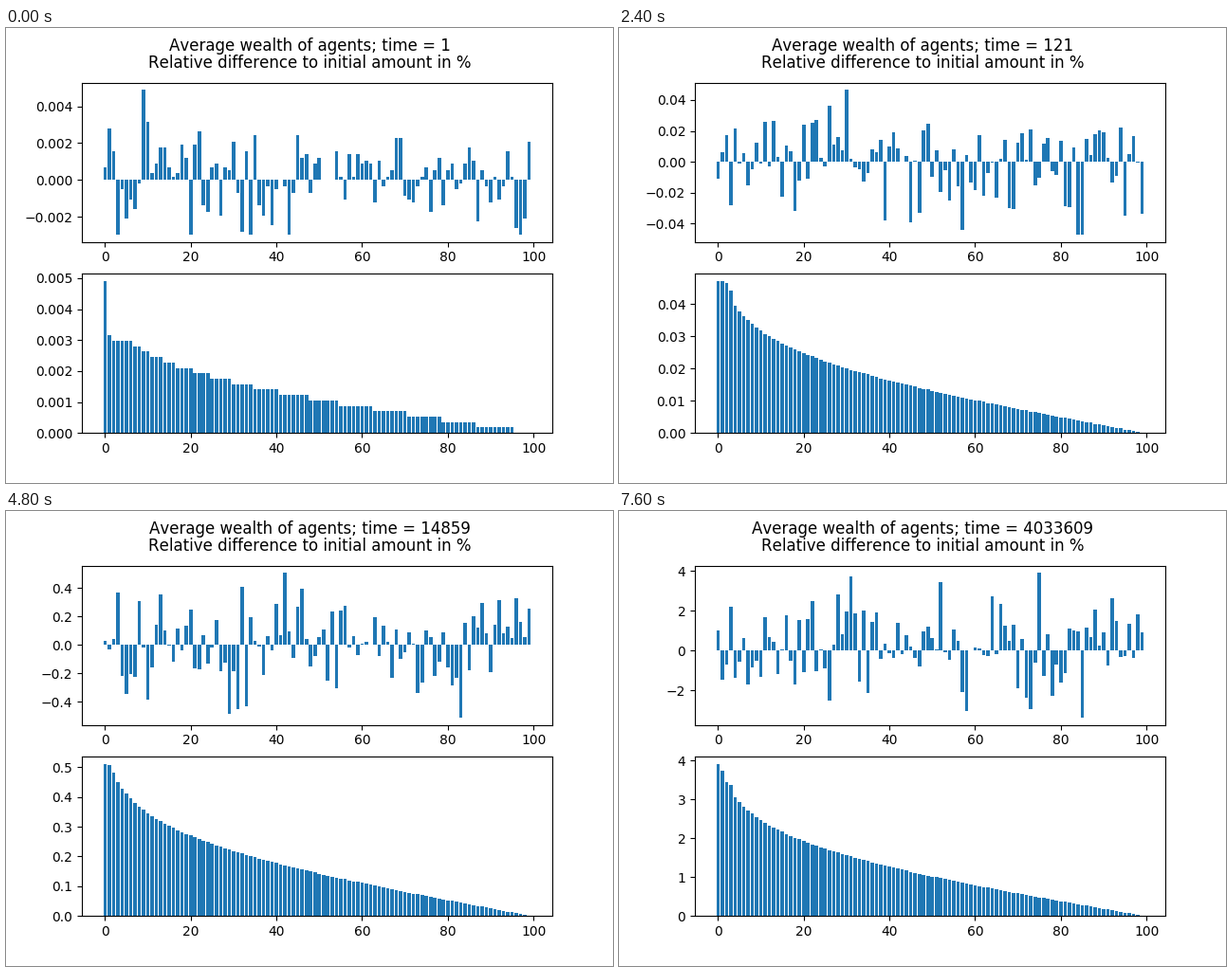
A matplotlib script for the animation above (8000 ms loop, 640x480 px).

```python
import numpy as np
import matplotlib.pyplot as plt
from matplotlib.animation import FuncAnimation

plt.rcParams["text.kerning_factor"] = 6

AGENTS = 100
STEPS = 20
LAST_TIME = 4033609.5   # simulated time at the last step, reached exponentially
QUANTUM = 0.000175      # smallest possible change in wealth, in %
SPREAD = 0.42           # standard deviation relative to the extremes

# Largest gain and loss at a few steps; they grow geometrically in between.
KEY_STEPS = [0, 2, 6, 10, 14, 17, 19]
GAINS = [.0049, .0086, .0465, .22, 1.17, 2.87, 3.9]
LOSSES = [.003, .01035, .047, .255, 1.02, 3.16, 3.38]

# Evenly spaced quantiles of the half-normal distribution.
normal_sample = np.random.default_rng(0).standard_normal(100_000)
QUANTILES = np.quantile(np.abs(normal_sample), (np.arange(AGENTS) + 0.5) / AGENTS)


def grow(step, key_values):
    return np.exp(np.interp(step, KEY_STEPS, np.log(key_values)))


def wealth_deviations(step):
    rng = np.random.default_rng(step)
    gain, loss = grow(step, GAINS), grow(step, LOSSES)
    signs = rng.choice([-1, 1], AGENTS)
    values = signs * rng.permutation(QUANTILES) * SPREAD * np.sqrt(gain * loss)
    values = np.clip(values, -loss, gain)
    values[values.argmax()] = gain
    values[values.argmin()] = -loss
    return np.round(values / QUANTUM) * QUANTUM


fig, (agent_ax, sorted_ax) = plt.subplots(2, figsize=(6.4, 4.8), dpi=100)
title = fig.suptitle("", linespacing=1.0)


def draw(step):
    deviations = wealth_deviations(step)
    ranked = np.sort(np.abs(deviations))[::-1]
    for ax, heights in ((agent_ax, deviations), (sorted_ax, ranked)):
        ax.clear()
        ax.bar(range(AGENTS), heights)
    time = int(LAST_TIME ** (step / (STEPS - 1)))
    title.set_text(f"Average wealth of agents; time = {time}\n"
                   "Relative difference to initial amount in %")


anim = FuncAnimation(fig, draw, frames=STEPS, interval=400, repeat=True, repeat_delay=0)
plt.show()
```
